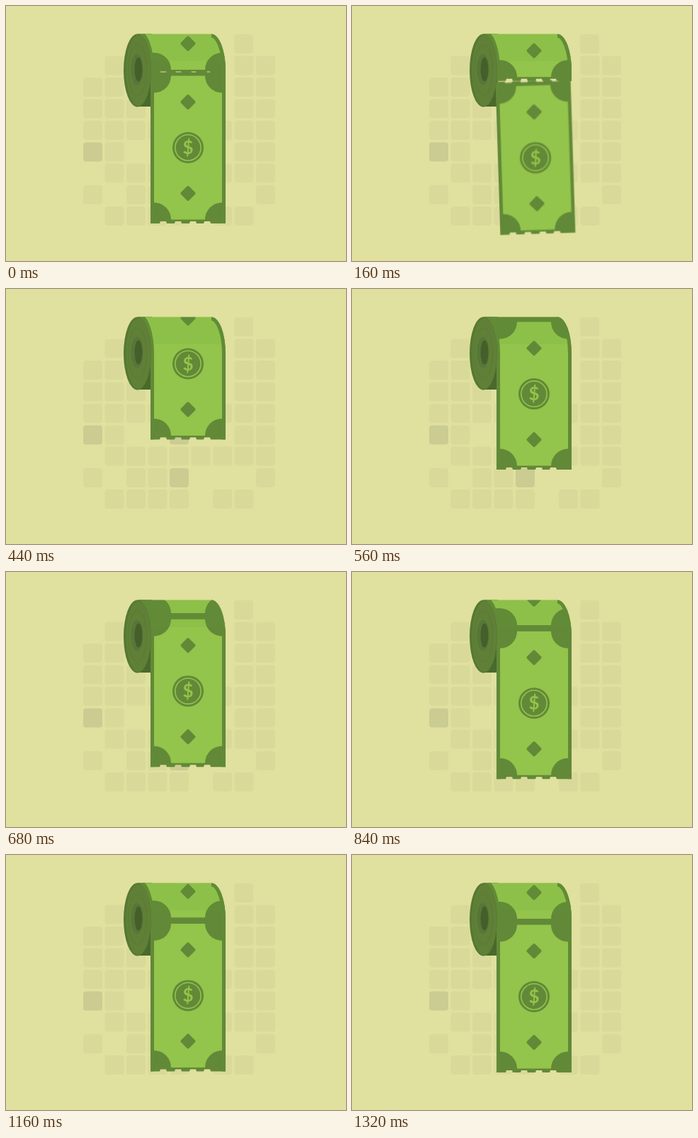
An HTML page without scripts that plays this animation: 480x360 px, repeating every 1.4 s.

```html
<!DOCTYPE html>
<html lang="en">
<head>
<meta charset="utf-8">
<title>Money roll</title>
<style>
  html, body { margin: 0; width: 100%; height: 100%; overflow: hidden; background: #e0e09f; }
  svg { display: block; width: 100vw; height: 100vh; }
  .tile { fill: #d9da99; }
  .tile-dark { fill: #cbcc92; }
  .paper { fill: #93c44b; }
  .ink { fill: #628938; }
  .ring { fill: none; stroke: #93c44b; stroke-width: 1.6; }
  .edge { fill: none; stroke: #628938; stroke-width: 10; }
  .sign { fill: #93c44b; font: 700 26px Lato, sans-serif; text-anchor: middle; }

  .unroll { animation: unroll 1.4s infinite; }
  .fall { animation: fall 1.4s infinite; }

  @keyframes unroll {
    0% { transform: translateY(0); animation-timing-function: cubic-bezier(.333, 0, .667, .253); }
    11.4286% { transform: translateY(10px); animation-timing-function: cubic-bezier(.333, .176, .667, .473); }
    22.8571% { transform: translateY(52.5px); animation-timing-function: cubic-bezier(.333, .263, .667, .675); }
    31.4286% { transform: translateY(116.5px); animation-timing-function: cubic-bezier(.333, .66, .667, .822); }
    48.5714% { transform: translateY(179.5px); animation-timing-function: cubic-bezier(.333, .574, .667, .856); }
    71.4286% { transform: translateY(205.5px); animation-timing-function: cubic-bezier(.333, .622, .667, 1); }
    94.2857%, 100% { transform: translateY(211.5px); }
  }
  @keyframes fall {
    0% { transform: translate(257px, 200px) rotate(0deg) scale(1); animation-timing-function: cubic-bezier(.333, 0, .667, .05); }
    11.4286% { transform: translate(259px, 214px) rotate(-1.8deg) scale(1.005); animation-timing-function: cubic-bezier(.333, .165, .667, .374); }
    22.8571% { transform: translate(272px, 295px) rotate(-6.6deg) scale(1.03); animation-timing-function: cubic-bezier(.333, .2, .667, .56); }
    31.4286%, 100% { transform: translate(291px, 485px) rotate(-9deg) scale(1.04); }
  }
</style>
</head>
<body>
<svg viewBox="0 0 480 360">
  <defs>
    <rect id="tile" width="27" height="27" rx="4"/>
    <g id="pair"><use href="#tile"/><use href="#tile" x="30.5"/></g>
    <g id="four"><use href="#pair"/><use href="#pair" x="61"/></g>

    <rect id="diamond" class="ink" x="-8" y="-8" width="16" height="16" rx="2" transform="rotate(45)"/>
    <!-- One end of a bill: border band, rounded corners and diamond -->
    <g id="end">
      <path class="ink" d="M-75 101.5H60V110H-75ZM-75 77.5H-48V110H-75Z"/>
      <circle class="ink" cx="-48" cy="101.5" r="24"/>
      <circle class="ink" cx="48" cy="101.5" r="24"/>
      <use href="#diamond" y="64.5"/>
    </g>
    <g id="bill">
      <rect class="paper" x="-75" y="-106" width="135" height="212"/>
      <use href="#end"/>
      <use href="#end" transform="matrix(1 0 0 -1 0 0)"/>
      <circle class="ink" r="22"/>
      <circle class="ring" r="18.2"/>
      <text class="sign" y="9">$</text>
    </g>

    <clipPath id="sheet">
      <path d="M-53-108.5H-40l1 2h9l1-2h11l1 2h9l1-2h11l1 2h9l1-2h11l1 2h9l1-2H53V107H32l-1-3h-8l-1 3H12l-1-3H3l-1 3H-9l-1-3h-8l-1 3H-30l-1-3h-8l-1 3H-53Z"/>
    </clipPath>
    <clipPath id="torn">
      <path class="unroll" d="M180-300H320V95.5H289l-1-3h-8l-1 3H269l-1-3h-8l-1 3H248l-1-3h-8l-1 3H227l-1-3h-8l-1 3H180Z"/>
    </clipPath>
    <clipPath id="body">
      <path d="M186 39.5H290A20 51.5 0 0 1 310 91V360H204V91A18 51.5 0 0 0 186 39.5Z"/>
    </clipPath>
  </defs>

  <rect width="480" height="360" fill="#e0e09f"/>

  <g class="tile">
    <use href="#tile" x="322" y="40"/>
    <use href="#tile" x="139.5" y="70.5"/><use href="#pair" x="322.5" y="70.5"/>
    <use href="#pair" x="109" y="101"/><use href="#pair" x="322.5" y="101"/>
    <use href="#pair" x="109" y="131.5"/><use href="#tile" x="170" y="131.5"/><use href="#pair" x="322.5" y="131.5"/>
    <use href="#four" x="109" y="162"/><use href="#four" x="231" y="162"/><use href="#tile" x="353" y="162"/>
    <use href="#tile" x="139.5" y="192.5"/><use href="#pair" x="322.5" y="192.5"/>
    <use href="#four" x="139.5" y="222.5"/><use href="#four" x="261.5" y="222.5"/>
    <use href="#tile" x="109" y="253"/><use href="#pair" x="170" y="253"/><use href="#tile" x="353" y="253"/>
    <use href="#four" x="139.5" y="283"/><use href="#pair" x="292" y="283"/>
  </g>
  <g class="tile-dark">
    <use href="#tile" x="109" y="192.5"/>
    <use href="#tile" x="231" y="131.5"/>
    <use href="#tile" x="231" y="192.5"/>
    <use href="#tile" x="231" y="253"/>
  </g>

  <path d="M186 39.5H206V142H186Z" fill="#486a2b"/>

  <g class="fall">
    <g clip-path="url(#sheet)">
      <use href="#bill"/>
      <path class="edge" d="M-53-110V110M53-110V110"/>
    </g>
  </g>

  <g clip-path="url(#body)">
    <g clip-path="url(#torn)">
      <g class="unroll">
        <use href="#bill" x="257" y="-223"/>
        <use href="#bill" x="257" y="-11.5"/>
      </g>
      <path class="edge" d="M204 360V91A18 51.5 0 0 0 186 39.5M290 39.5A20 51.5 0 0 1 310 91V360"/>
      <path d="M180 39H310V78H180Z" fill="#5c9a30" opacity=".1"/>
    </g>
  </g>

  <ellipse cx="185.5" cy="91" rx="19.5" ry="51.5" fill="#567833"/>
  <ellipse cx="187" cy="91" rx="17.5" ry="50" fill="#5f8036"/>
  <ellipse cx="185.5" cy="90.5" rx="13" ry="36" fill="none" stroke="#5a7a34"/>
  <ellipse cx="185" cy="89.5" rx="8.5" ry="22" fill="#56773a"/>
  <ellipse cx="187" cy="89.5" rx="5.5" ry="17" fill="#465f2a"/>
</svg>
</body>
</html>
```
